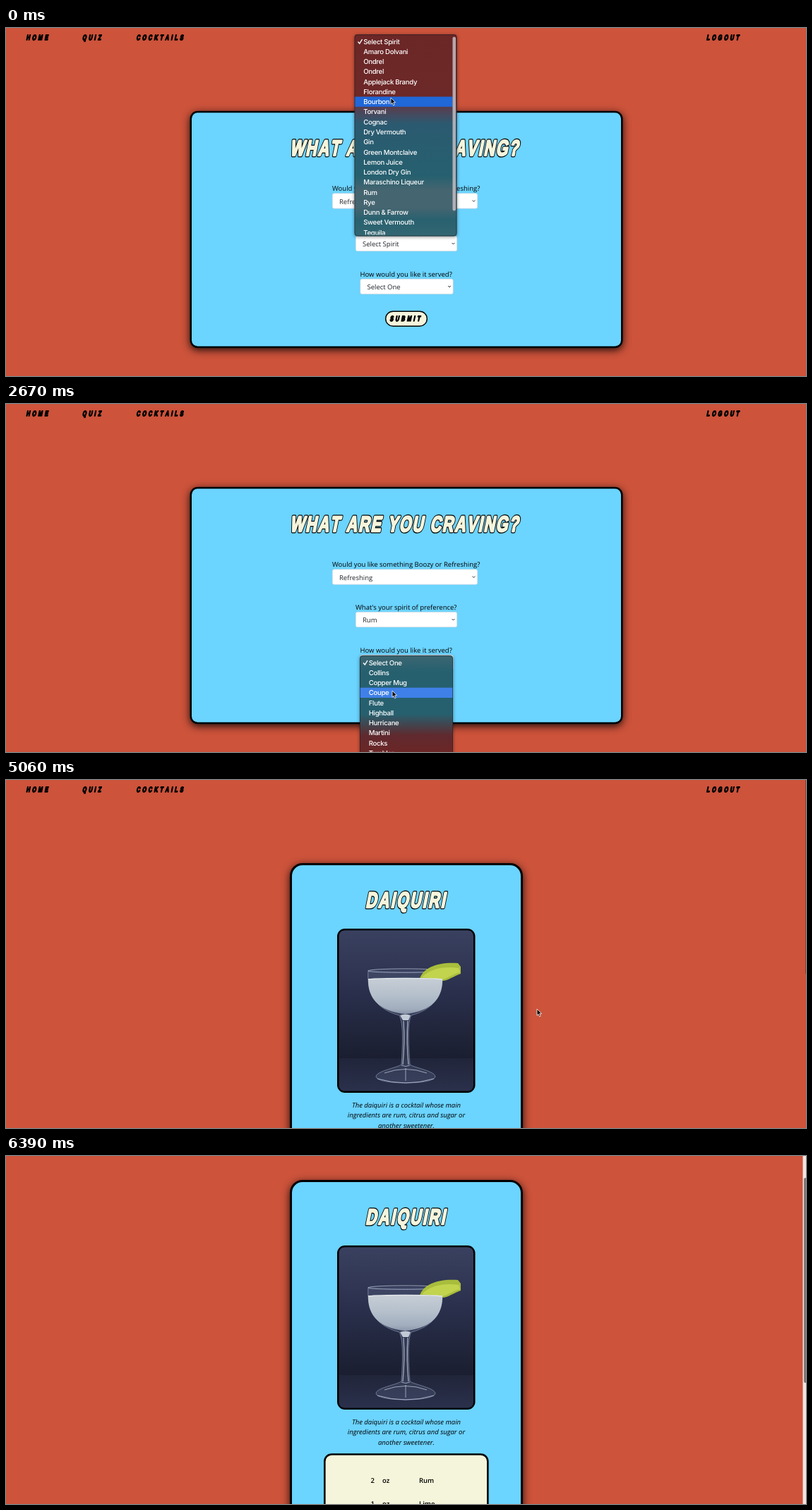
An HTML page with a canvas that plays this animation: 1133 px wide and 494 px high, repeating every 6.84 s.

```html
<!DOCTYPE html>
<html lang="en">
<head>
<meta charset="utf-8">
<title>Cocktail quiz</title>
<style>
html, body { margin: 0; width: 100%; height: 100%; overflow: hidden; background: #cd533b; }
canvas { display: block; }
</style>
</head>
<body>
<canvas id="stage" width="1133" height="494"></canvas>
<script>
const c = document.getElementById('stage').getContext('2d');
const LOOP = 6840, STEPS = 46, ROW = 14.27;
const RED = '#cd533b', SKY = '#6bd4ff', CREAM = '#f5f5dc';

const spirits = ['Select Spirit', 'Amaro Dolvani', 'Ondrel', 'Ondrel', 'Applejack Brandy', 'Florandine',
  'Bourbon', 'Torvani', 'Cognac', 'Dry Vermouth', 'Gin', 'Green Montclaive', 'Lemon Juice', 'London Dry Gin',
  'Maraschino Liqueur', 'Rum', 'Rye', 'Dunn & Farrow', 'Sweet Vermouth', 'Tequila'];
const glasses = ['Select One', 'Collins', 'Copper Mug', 'Coupe', 'Flute', 'Highball', 'Hurricane',
  'Martini', 'Rocks', 'Tumbler'];

// [step, value, ...]
const pointer = [[0, 545, 99], [5, 537, 240.5], [6, 537, 240.5], [7, 538, 232], [9, 538, 232],
  [13, 549, 366], [14, 549, 366], [18, 547, 407], [19, 547, 407], [24, 563, 411], [29, 563, 411],
  [30, 600, 395], [31, 600, 395], [34, 752, 325], [39, 752, 325], [42, 1140, 318]];
const scrolling = [[34, 0], [38, 50], [43, 84]];

function track(keys, n) {
  const i = keys.findIndex(k => k[0] > n);
  if (i === 0) return keys[0].slice(1);
  if (i < 0) return keys[keys.length - 1].slice(1);
  const a = keys[i - 1], b = keys[i], p = (n - a[0]) / (b[0] - a[0]);
  return a.slice(1).map((v, j) => v + (b[j + 1] - v) * p);
}

function box(x, y, w, h, r, fill, line, width) {
  c.beginPath();
  c.roundRect(x, y, w, h, r);
  if (fill) { c.fillStyle = fill; c.fill(); }
  if (line) { c.strokeStyle = line; c.lineWidth = width; c.stroke(); }
}

function shape(d, fill, line, width) {
  const p = new Path2D(d);
  if (fill) { c.fillStyle = fill; c.fill(p); }
  if (line) { c.strokeStyle = line; c.lineWidth = width; c.stroke(p); }
}

function fade(y0, y1, stops) {
  const g = c.createLinearGradient(0, y0, 0, y1);
  stops.forEach(([at, col]) => g.addColorStop((at - y0) / (y1 - y0), col));
  return g;
}

function text(s, x, y, color = '#000', style = '', align = 'left') {
  c.font = `${style} 9.5px "Open Sans", sans-serif`;
  c.textAlign = align;
  c.fillStyle = color;
  c.fillText(s, x, y);
}

// Narrow slanted comic lettering; layers are [colour, outline width]
function comic(s, x, y, size, gap, layers) {
  c.save();
  c.transform(.69, 0, -.2, 1, x, y);
  c.font = `bold ${size}px "Liberation Sans", Arial, sans-serif`;
  c.letterSpacing = gap / .69 + 'px';
  c.fontKerning = 'none';
  c.textAlign = 'left';
  c.lineJoin = 'round';
  for (const [color, width] of layers) {
    c.fillStyle = c.strokeStyle = color;
    c.lineWidth = width;
    c.strokeText(s, 0, 0);
    c.fillText(s, 0, 0);
  }
  c.restore();
}
const title = (s, x, gap) => comic(s, x, 180.5, 31, gap, [['#000', 5], [CREAM, 2.5]]);
const label = (s, x, y, color = '#000') => comic(s, x, y, 10.3, 3.1, [[color, 1.6]]);

function card(x, y, w, h, r, edge) {
  c.save();
  c.shadowColor = 'rgba(0,0,0,.85)';
  c.shadowBlur = 12;
  c.shadowOffsetY = 3;
  box(x, y, w, h, r, '#000');
  c.restore();
  box(x + edge, y + edge, w - 2 * edge, h - 2 * edge, r - edge, SKY);
}

function nav() {
  label('HOME', 28.5, 16.5);
  label('QUIZ', 108, 16.5);
  label('COCKTAILS', 184.5, 16.5);
  label('LOGOUT', 992, 16.5);
}

function field(question, value, x, y, w) {
  text(question, x, Math.round(y - 3.2));
  box(x + .3, y + .3, w - .6, 21.4, 2.5, '#fff', '#ced4da', .65);
  text(value, x + 10, y + 15, '#212529');
  c.save();
  c.translate(x + w - 5.5, y + 11);
  shape('M-1.9 -1L0 1L1.9 -1', null, '#333', 1);
  c.restore();
}

function menu(items, x, y, w, h, glass, hot, bar) {
  c.save();
  c.shadowColor = 'rgba(0,0,0,.45)';
  c.shadowBlur = 5;
  c.shadowOffsetY = 1;
  box(x, y, w, h, 4, glass);
  c.restore();
  c.save();
  c.beginPath();
  c.roundRect(x, y, w, h - 2, 4);
  c.clip();
  const mid = i => y + 10 + i * ROW;
  c.fillStyle = hot < 9 && bar ? '#2067d8' : '#3f80e8';
  c.fillRect(x, mid(hot) - 7.1, bar ? w - 6 : w, ROW);
  c.font = '500 9.6px Inter, sans-serif';
  c.letterSpacing = '-.3px';
  c.textAlign = 'left';
  c.fillStyle = '#fff';
  items.forEach((s, i) => c.fillText(s, x + 12.7, mid(i) + 3.6));
  c.translate(x, y);
  shape('M5 10.5L7.3 13L11 7', null, '#fff', 1.4);
  c.restore();
  if (bar) box(x + w - 6, y + 3.5, 4.5, 247, 2.2, 'rgba(196,190,194,.85)');
  box(x + .5, y + .5, w - 1, h - 1, 4, null, 'rgba(30,30,34,.55)', 1);
}

function quiz(n, y) {
  const over = n >= 21;
  nav();
  card(260.5, 117.8, 613, 336.4, 11, 2.5);
  title('WHAT ARE YOU CRAVING?', 402, 1.9);
  field('Would you like something Boozy or Refreshing?', 'Refreshing', 462, 234.5, 206);
  field("What's your spirit of preference?", n < 9 ? 'Select Spirit' : 'Rum', 495, 295, 144);
  field('How would you like it served?', n < 20 ? 'Select One' : 'Coupe', 501.5, 356, 132);
  box(537.7, 402.2, 58.6, 21, 10.5, over ? '#000' : CREAM, '#000', 1.4);
  label('SUBMIT', 543.5, 416.3, over ? CREAM : '#000');
  if (n < 9) {
    const glass = fade(9, 296, [[9, '#6b2626'], [96, '#6d2828'], [118, '#4f4458'], [136, '#2b5a70'],
      [210, '#26606f'], [230, '#456570'], [255, '#456570'], [272, '#29616f'], [296, '#336672']]);
    menu(spirits, 493.5, 9, 145, 286.5, glass, Math.floor((y - 12) / ROW), true);
  } else if (n >= 14 && n < 20) {
    const glass = fade(357, 494, [[357, '#3d6671'], [380, '#26606f'], [440, '#26606f'], [470, '#5f2a2f'], [494, '#6b2626']]);
    menu(glasses, 501, 357, 132, 150, glass, Math.floor((y - 360) / ROW), false);
  }
}

function photo() {
  c.save();
  box(469, 211, 195.5, 233, 11, '#000');
  c.beginPath();
  c.roundRect(471.5, 213.5, 190.5, 228, 8);
  c.clip();
  c.fillStyle = fade(213, 395, [[213, '#3a4160'], [300, '#2a304c'], [395, '#1a1e30']]);
  c.fillRect(471, 213, 192, 183);
  c.fillStyle = fade(395, 443, [[395, '#20253a'], [443, '#2b314c']]);
  c.fillRect(471, 395, 192, 48);
  // glass, then drink and lime
  const rim = 'rgba(190,200,220,.75)';
  shape('M513 270C511 300 520 324 557 334C563 345 562 375 560 404C552 409 525 413 524 421C525 433 607 433 608 421C607 413 580 409 572 404C570 375 568 345 574 334C611 324 620 300 618 270',
    'rgba(120,135,170,.2)', 'rgba(165,178,205,.55)', 1);
  shape('M513 271C514 267 617 267 618 271C617 274 514 274 513 271Z', null, rim, 1);
  shape('M586 282C591 266 612 258 640 260L644 265V275C635 278 624 286 617 285Z', '#a9bd3c');
  shape('M589 280C601 267 623 264 641 267L643 273C631 276 622 284 616 283Z', '#c2d34e');
  shape('M513 282H618C619 306 607 325 574 331Q565 333 557 331C524 325 512 306 513 282Z',
    fade(282, 333, [[282, '#c6cdd5'], [305, '#b5c0cc'], [325, '#a1adbd'], [333, '#8793a8']]));
  shape('M513 283C530 281 600 281 618 283', null, '#dfe4e8', 1.5);
  shape('M558 334Q566 331 573 334L570 341H562Z', '#c1cad6');
  shape('M563 342Q565 372 562 404M569 342Q567 372 570 404', null, rim, 1.4);
  shape('M560 405Q566 408 572 405M536 416Q566 405 596 416M526 424Q566 436 606 424M566 409V427', null, rim, 1);
  c.restore();
}

function recipe(n, s) {
  c.save();
  c.translate(0, -s);
  nav();
  card(402, 118, 330, 700, 18, 3);
  title('DAIQUIRI', 509, 2.3);
  photo();
  ['The daiquiri is a cocktail whose main', 'ingredients are rum, citrus and sugar or', 'another sweetener.']
    .forEach((line, i) => text(line, 567, 465 + i * 14.3, '#000', 'italic', 'center'));
  box(451.3, 507.5, 231, 200, 10, CREAM, '#000', 2.6);
  [['2', 'Rum'], ['1', 'Lime']].forEach(([amount, name], i) => {
    const y = 548 + i * 33;
    text(amount, 516.5, y, '#000', '600');
    text('oz', 533, y, '#000', '600');
    text(name, 585, y, '#000', '600');
  });
  c.restore();
  const top = -16 + s * .56;
  if (n >= 42) {
    c.fillStyle = '#f3e6e2';
    c.fillRect(1128.5, 0, 5, 494);
    box(1130, top, 4, 291, 2, '#7c7776');
  } else {
    c.fillStyle = 'rgba(90,50,45,.6)';
    c.fillRect(1132, top, 1, 291);
  }
}

function cursor(x, y, hand) {
  c.save();
  c.translate(x, y);
  c.lineJoin = 'round';
  if (hand) shape('M.2 1Q1.4 -.3 2 1.2L3 4L6 4.6Q7.8 5 7.6 7L6.8 10.5H2.8L-.5 7Q-.4 5.8 1.2 6.3Z', '#fff', '#000', .7);
  else shape('M0 0V9.2L2.1 7.3L3.6 10.8L5.2 10.1L3.7 6.7H6.6Z', '#000', '#fff', .8);
  c.restore();
}

function draw(now) {
  const n = Math.floor((now % LOOP + 8) / (LOOP / STEPS)) % STEPS;
  const [x, y] = track(pointer, n);
  c.fillStyle = RED;
  c.fillRect(0, 0, 1133, 494);
  c.textRendering = 'geometricPrecision';
  if (n < 29) quiz(n, y);
  else recipe(n, track(scrolling, n)[0]);
  cursor(x, y, n >= 21 && n < 29);
  requestAnimationFrame(draw);
}
requestAnimationFrame(draw);
</script>
</body>
</html>
```
